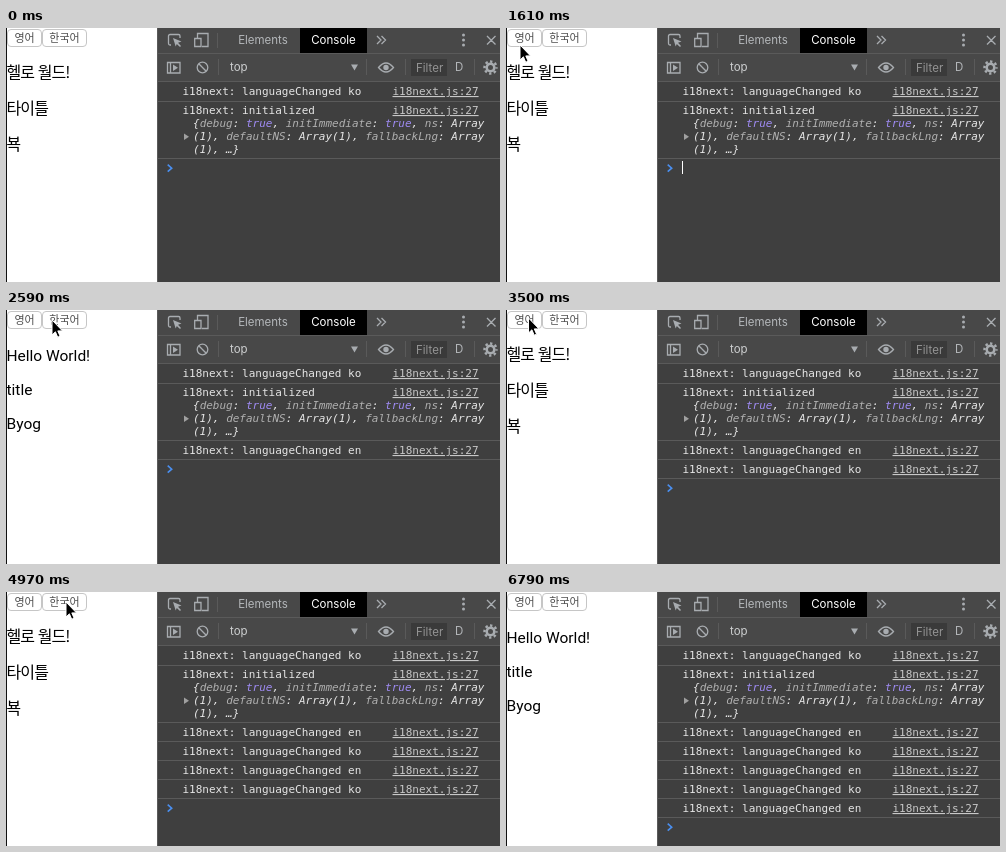
Recreate the animation shown at these times as an HTML page. Size 494 px wide and 254 px high, loop 7070 ms.

```html
<!DOCTYPE html>
<html lang="ko">
<head>
<meta charset="utf-8">
<title>Language switch</title>
<style>
  html, body { margin: 0; width: 100%; height: 100%; overflow: hidden; background: #fff; }
  svg { display: block; width: 494px; height: 254px; }
  text { white-space: pre; }
  .ui { font: 11.5px Inter, Roboto, sans-serif; fill: #b4b7ba; }
  .mono { font: 11px "DejaVu Sans Mono", Menlo, monospace; fill: #e6e6e6; -webkit-text-stroke: .3px #e6e6e6; }
  .link { fill: #c8c8c8; text-decoration: underline; -webkit-text-stroke: 0; }
  .obj { font-style: italic; }
  .key { fill: #b0b0b0; -webkit-text-stroke: .15px #b0b0b0; }
  .bool { fill: #a08cf5; -webkit-text-stroke: .3px #a08cf5; }
  .ko { font: 16px "Noto Sans CJK KR", "Noto Sans CJK", sans-serif; letter-spacing: -.9px; }
  .en { font: 15.5px Roboto, "Liberation Sans", sans-serif; }
  .btn rect { fill: #fff; stroke: #c6c6c6; }
  .btn text { font: 11px "Noto Sans CJK KR", "Noto Sans CJK", sans-serif; fill: #4c4c4c; text-anchor: middle; }
  .btn.down rect { fill: #3d8ef8; stroke: #2a6fd6; }
  .btn.down text { fill: #fff; }
  .line { stroke: #5a5a5a; }
  .icon { fill: none; stroke: #a8acb0; stroke-width: 1.3; }
  .solid { fill: #a8acb0; stroke: none; }
</style>
</head>
<body>
<svg viewBox="0 0 494 254">
  <rect width="494" height="254" fill="#fff"/>
  <rect width="1" height="254" fill="#111"/>

  <g class="btn"><rect x="1.5" y="1.5" width="34" height="17" rx="3.5"/><text x="18.5" y="13.5">영어</text></g>
  <g class="btn"><rect x="36.5" y="1.5" width="44" height="17" rx="3.5"/><text x="58.5" y="13.5">한국어</text></g>
  <g id="ko" class="ko">
    <text x="0.5" y="50">헬로 월드!</text><text x="0.5" y="86">타이틀</text><text x="0.5" y="122">뵥</text>
  </g>
  <g id="en" class="en">
    <text x="0.5" y="51">Hello World!</text><text x="0.5" y="85">title</text><text x="0.5" y="119">Byog</text>
  </g>

  <!-- developer tools panel -->
  <rect x="151" width="343" height="254" fill="#3f3f3f"/>
  <rect x="152" width="342" height="53" fill="#484848"/>
  <rect x="151" width="1" height="254" fill="#5a5a5a"/>
  <rect x="294" width="67" height="25" fill="#000"/>
  <path class="line" d="M152 25.5H494M152 53.5H494M152 73.5H494M152 130.5H494M211.5 5V20M212.5 31V47M360.5 31V47M399.5 31V47M468.5 31V47"/>

  <g class="icon">
    <path d="M165 17H164Q162.500 17 162.500 15.500V8Q162.500 6.500 164 6.500H172.500Q174 6.500 174 8V10"/>
    <path class="solid" d="M167 10L175.500 13.500L172 14.800L175 18L174 19L170.800 16L169.700 18.500Z"/>
    <path d="M191.500 10V5.500H202V18.500H196M188.700 10.500H195V18.500H188.700Z"/>
    <path d="M371 8L375 12L371 16M375.500 8L379.500 12L375.500 16M481 8L489.500 16.500M489.500 8L481 16.500"/>
    <path d="M161.500 34.500H174V45H161.500ZM164.500 34.500V45"/>
    <path class="solid" d="M167 36.500L172 39.700L167 43Z"/>
    <circle cx="196.500" cy="39.500" r="5.300"/><path d="M192.800 35.800L200.200 43.200"/>
    <path d="M372.500 39.500Q380 30.500 387.500 39.500Q380 48.500 372.500 39.500Z"/>
    <circle class="solid" cx="380" cy="39.500" r="2.700"/>
    <path class="solid" d="M345 36.500H352L348.500 42.500Z"/>
    <circle cx="484.500" cy="39.500" r="3.800" stroke-width="2.600"/>
    <circle cx="484.500" cy="39.500" r="6" stroke-width="2.400" stroke-dasharray="2.356" stroke-dashoffset="1.178"/>
    <g class="solid"><circle cx="457.500" cy="7" r="1.500"/><circle cx="457.500" cy="12" r="1.500"/><circle cx="457.500" cy="17" r="1.500"/></g>
  </g>
  <rect x="405" y="31" width="36" height="17" fill="#3a3a3a"/>
  <g class="ui">
    <text x="257" y="16" text-anchor="middle">Elements</text>
    <text x="327.500" y="16" text-anchor="middle" style="fill:#fff">Console</text>
    <text x="224" y="43" style="fill:#cccecf">top</text>
    <text x="410" y="44" style="fill:#949494">Filter</text>
    <text x="449" y="43">D</text>
  </g>

  <g class="mono">
    <text x="176.500" y="67">i18next: languageChanged ko</text><text class="link" x="386.500" y="67">i18next.js:27</text>
    <text x="176.500" y="86">i18next: initialized</text><text class="link" x="386.500" y="86">i18next.js:27</text>
    <g class="obj">
      <text x="187" y="99">{<tspan class="key">debug</tspan>: <tspan class="bool">true</tspan>, <tspan class="key">initImmediate</tspan>: <tspan class="bool">true</tspan>, <tspan class="key">ns</tspan>: Array</text>
      <text x="187" y="112">(1), <tspan class="key">defaultNS</tspan>: Array(1), <tspan class="key">fallbackLng</tspan>: Array</text>
      <text x="187" y="125">(1), …}</text>
    </g>
    <path d="M178 105.500L183 108.700L178 112Z" fill="#a0a0a0"/>
    <g id="log"></g>
  </g>
  <g id="prompt">
    <path d="M161.700 136.700L165.700 140.200L161.700 143.700" fill="none" stroke="#4a8ff0" stroke-width="1.600"/>
    <rect id="caret" x="176" y="133" width="1" height="13" fill="#fff"/>
  </g>
  <path id="mouse" d="M0 0V15L3.400 11.800L5.700 17.200L8.100 16.200L5.800 10.900H10.500Z" fill="#000" stroke="#fff"/>
</svg>
<script>
const LOOP = 7070, STEP = 70, ROW = 19;
const $ = id => document.getElementById(id);
const show = (el, on) => el.setAttribute('visibility', on ? 'visible' : 'hidden');
const move = (el, x, y) => el.setAttribute('transform', `translate(${x} ${y})`);

// press time, release time, button
const clicks = [[2030, 2100, 0], [2800, 2870, 1], [3640, 3710, 0], [4690, 4830, 1], [6090, 6160, 0]];

// time, x, y, and 1 where the move into the point is eased
const path = [
  [980, 112, 216], [1120, 68, 128], [1260, 38, 62], [1400, 23, 30], [1540, 15, 19], [1610, 14, 17],
  [1890, 13, 15], [2100, 13, 15], [2590, 46, 10, 1], [3010, 46, 10], [3430, 22.5, 8, 1],
  [3640, 22.5, 8], [3780, 21, 8], [3920, 21, 8], [4410, 60, 9, 1], [4900, 60, 9], [5110, 60, 12],
  [5250, 60, 12], [5670, 32.5, 12, 1], [6300, 32.5, 12], [6370, 28, 16], [6440, 36, 40],
  [6580, 95, 140], [6720, 172, 238]
];

const buttons = document.querySelectorAll('.btn');
const rows = clicks.map((c, i) => {
  const row = document.createElementNS('http://www.w3.org/2000/svg', 'g');
  row.innerHTML = `<text x="176.500" y="144">i18next: languageChanged ${i % 2 ? 'ko' : 'en'}</text>
    <text class="link" x="386.500" y="144">i18next.js:27</text><path class="line" d="M152 149.500H494"/>`;
  move(row, 0, i * ROW);
  $('log').append(row);
  return row;
});

function mouseAt(t) {
  const i = path.findIndex(p => p[0] >= t);
  if (i < 0 || t < path[0][0]) return null;
  if (i === 0) return path[0].slice(1, 3);
  const [t0, x0, y0] = path[i - 1], [t1, x1, y1, eased] = path[i];
  let k = (t - t0) / (t1 - t0);
  if (eased) k = k * k * (3 - 2 * k);
  return [x0 + (x1 - x0) * k, y0 + (y1 - y0) * k];
}

function draw(t) {
  const count = clicks.filter(c => t >= c[1]).length;
  rows.forEach((row, i) => show(row, i < count));
  show($('en'), count % 2 === 1);
  show($('ko'), count % 2 === 0);
  move($('prompt'), 0, count * ROW);
  show($('caret'), (t >= 420 && t < 910) || (t >= 1470 && t < 2030));
  buttons.forEach((b, i) =>
    b.classList.toggle('down', clicks.some(c => c[2] === i && t >= c[0] && t < c[1])));
  const at = mouseAt(t);
  show($('mouse'), at);
  if (at) move($('mouse'), at[0], at[1]);
}

const start = performance.now();
function tick() {
  const t = (performance.now() - start) % LOOP;
  draw(Math.floor(t / STEP) * STEP);
  requestAnimationFrame(tick);
}
tick();
</script>
</body>
</html>
```
